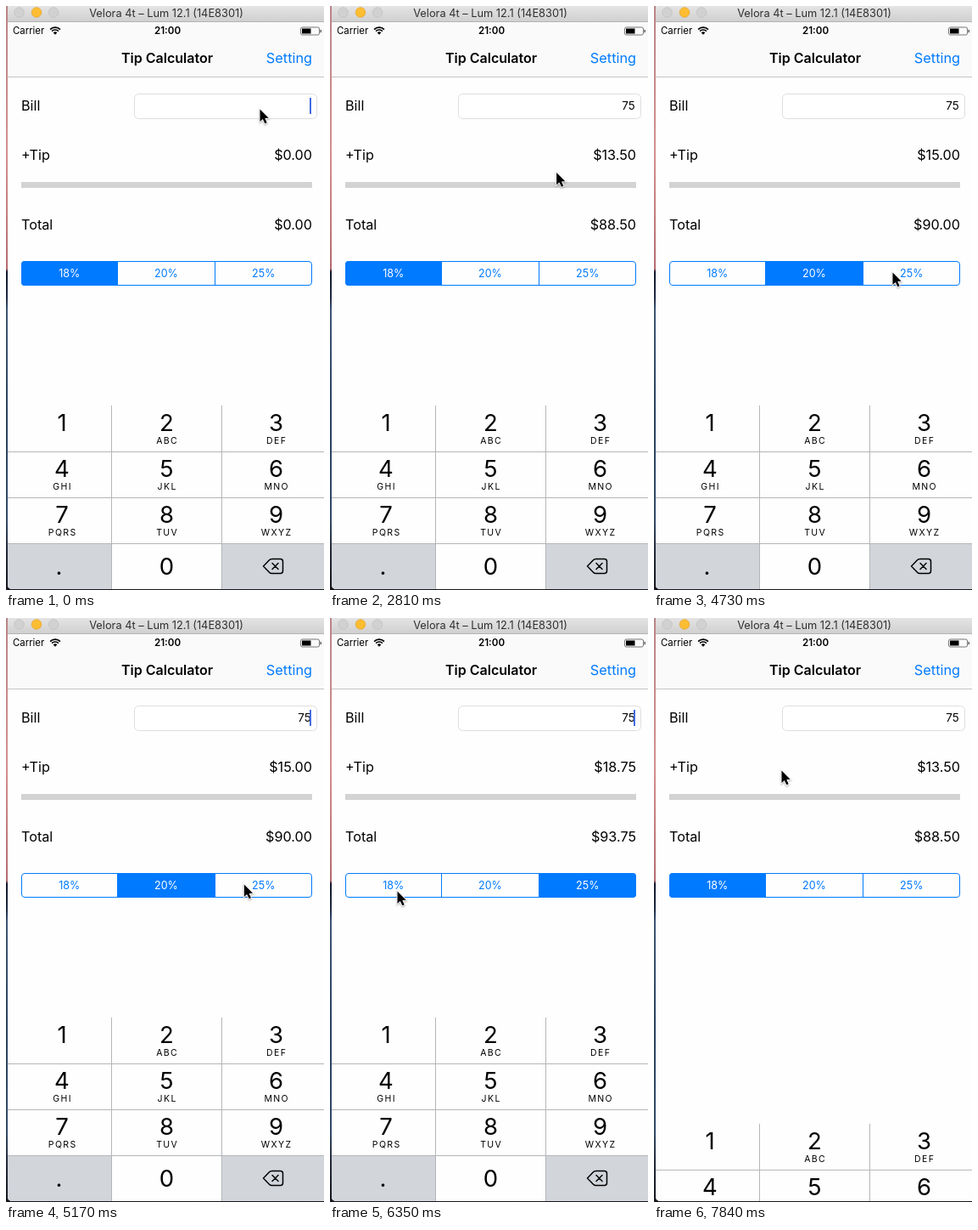
Animation, 375 px wide and 687 px high, one loop 7990 ms. Source, as an HTML page with a canvas:

```html
<!DOCTYPE html>
<html lang="en">
<head>
<meta charset="utf-8">
<title>Tip Calculator</title>
<style>
  html, body { margin: 0; width: 100%; height: 100%; overflow: hidden; background: #fff; }
  canvas { display: block; width: 375px; height: 687px; }
</style>
</head>
<body>
<canvas id="stage"></canvas>
<script>
const W = 375, H = 687, LOOP = 7990, STEP = 7840 / 53;
const BLUE = '#007aff';
const canvas = document.getElementById('stage');
const ctx = canvas.getContext('2d');
const ratio = window.devicePixelRatio || 1;
canvas.width = W * ratio;
canvas.height = H * ratio;

const clamp = v => Math.max(0, Math.min(1, v));
const smooth = v => { v = clamp(v); return v * v * (3 - 2 * v); };
const mix = (a, b, k) => a + (b - a) * k;

// Entries and selections, each starting a fade of the results.
const events = [
  { at: 900, bill: '7', seg: 0 },
  { at: 1500, bill: '75', seg: 0 },
  { at: 3450, bill: '75', seg: 1 },
  { at: 5570, bill: '75', seg: 2 },
  { at: 6670, bill: '75', seg: 0 }
];
const rates = [18, 20, 25];

// Pointer path: time, x, y.
const path = [
  [2600, 299, 122], [3130, 206, 336], [3420, 195, 319], [3760, 195, 319],
  [4640, 281, 314], [5500, 280, 314], [5790, 280, 314], [6050, 79, 322],
  [7130, 79, 322], [7640, 150, 180]
];

function pointer(t) {
  const i = path.findIndex(p => p[0] > t);
  if (i === 0) return path[0].slice(1);
  if (i < 0) return path[path.length - 1].slice(1);
  const [a, b] = [path[i - 1], path[i]];
  const k = smooth((t - a[0]) / (b[0] - a[0]));
  return [mix(a[1], b[1], k), mix(a[2], b[2], k)];
}

function caretAlpha(t) {
  if (t >= 900 && t < 1590) return 1;
  const p = t < 900 ? t - 110 : (t - 1590) % 1000;
  if (p < 0) return 1;
  return p < 400 ? 1 - smooth(p / 130) : smooth((p - 400) / 200);
}

function rect(x, y, w, h, color) {
  ctx.fillStyle = color;
  ctx.fillRect(x, y, w, h);
}

function round(x, y, w, h, r) {
  ctx.beginPath();
  ctx.roundRect(x, y, w, h, r);
}

function disc(x, y, r, fill, stroke) {
  ctx.beginPath();
  ctx.arc(x, y, r, 0, 7);
  ctx.fillStyle = fill;
  ctx.fill();
  ctx.strokeStyle = stroke;
  ctx.lineWidth = 0.7;
  ctx.stroke();
}

function text(str, x, y, size, { align = 'left', color = '#000', weight = 400, spacing = 0 } = {}) {
  ctx.font = `${weight} ${size}px Inter, sans-serif`;
  ctx.letterSpacing = spacing + 'px';
  ctx.textAlign = align;
  ctx.fillStyle = color;
  ctx.fillText(str, x, y);
}

function vertical(y0, y1, stops) {
  const g = ctx.createLinearGradient(0, y0, 0, y1);
  stops.forEach(([k, c]) => g.addColorStop(k, c));
  return g;
}

function drawDesktop() {
  rect(0, 0, W, H, vertical(0, H, [
    [0, '#b98587'], [0.25, '#d3918e'], [0.45, '#b46b70'], [0.455, '#141a2c'],
    [0.5, '#202c47'], [0.52, '#3d5877'], [0.7, '#2b425f'], [0.88, '#334c69'],
    [0.93, '#252b3c'], [1, '#15171c']
  ]));
}

function drawTitleBar() {
  rect(2, 0, 373, 18, vertical(0, 18, [[0, '#e5e4e5'], [1, '#d1d0d1']]));
  rect(2, 18, 373, 1, '#b5b4b5');
  disc(15.5, 7.5, 5.8, '#d2d1d2', '#bebdbe');
  disc(36, 7.5, 5.8, '#fdbd32', '#df9f25');
  disc(56, 7.5, 5.8, '#d2d1d2', '#bebdbe');
  text('Velora 4t – Lum 12.1 (14E8301)', 189, 13, 12.8, { align: 'center', color: '#303030' });
}

function drawStatusBar() {
  text('Carrier', 8, 33.3, 11.4);
  text('21:00', 190.5, 33.3, 11.6, { align: 'center', weight: 600 });
  ctx.strokeStyle = '#000';
  ctx.lineWidth = 1.7;
  [8.4, 5.5].forEach(r => {
    ctx.beginPath();
    ctx.arc(58, 33.5, r, -Math.PI * 0.75, -Math.PI * 0.25);
    ctx.stroke();
  });
  ctx.beginPath();
  ctx.moveTo(58, 33.7);
  ctx.arc(58, 33.7, 3.2, -Math.PI * 0.75, -Math.PI * 0.25);
  ctx.fillStyle = '#000';
  ctx.fill();

  round(347.5, 25, 22, 9, 2);
  ctx.strokeStyle = '#555';
  ctx.lineWidth = 0.8;
  ctx.stroke();
  rect(349, 26.5, 10.5, 6, '#000');
  rect(370.5, 28, 1.4, 3.2, '#555');
}

function drawNav() {
  rect(2, 19, 373, 64, '#fafafa');
  rect(2, 83, 373, 1, '#c5c5c7');
  drawStatusBar();
  text('Tip Calculator', 190, 67, 16, { align: 'center', weight: 600 });
  text('Setting', 361, 67, 16.3, { align: 'right', color: BLUE });
}

function drawForm(t, event) {
  text('Bill', 18, 122.5, 16.2);
  round(151.5, 103.5, 215, 29, 5);
  ctx.fillStyle = '#fff';
  ctx.fill();
  ctx.strokeStyle = '#dedede';
  ctx.lineWidth = 1;
  ctx.stroke();
  if (event) text(event.bill, 359.7, 122.3, 13.4, { align: 'right' });
  ctx.globalAlpha = caretAlpha(t);
  rect(358, 108, 2, 19, '#426bdf');

  const bill = event ? +event.bill : 0;
  const tip = bill * rates[event ? event.seg : 0] / 100;
  ctx.globalAlpha = event ? smooth((t - event.at) / 300) : 1;
  text('+Tip', 18, 180.5, 16.2);
  text('$' + tip.toFixed(2), 361, 180.5, 16.2, { align: 'right' });
  text('Total', 18, 262.5, 16.2);
  text('$' + (bill + tip).toFixed(2), 361, 262.5, 16.2, { align: 'right' });
  ctx.globalAlpha = 1;
  rect(18, 207, 343, 7, '#d3d3d3');
}

function drawSegments(t, event, previous) {
  const edges = [18, 131.5, 246.5, 361];
  const now = event ? event.seg : 0;
  const before = previous ? previous.seg : 0;
  const k = event ? smooth((t - event.at) / 135) : 1;
  ctx.save();
  round(18, 300, 343, 29, 4);
  ctx.clip();
  rates.forEach((rate, i) => {
    const on = mix(i === before ? 1 : 0, i === now ? 1 : 0, k);
    const x = edges[i], w = edges[i + 1] - x;
    ctx.globalAlpha = on;
    rect(x, 300, w, 29, BLUE);
    ctx.globalAlpha = 1;
    const color = `rgb(${255 * on}, ${mix(122, 255, on)}, 255)`;
    text(rate + '%', x + w / 2, 319, 12.5, { align: 'center', color });
  });
  ctx.restore();
  rect(131, 300, 1, 29, BLUE);
  rect(246, 300, 1, 29, BLUE);
  round(18.5, 300.5, 342, 28, 3.5);
  ctx.strokeStyle = BLUE;
  ctx.lineWidth = 1;
  ctx.stroke();
}

function drawDelete(x, y) {
  ctx.strokeStyle = '#000';
  ctx.lineWidth = 1.5;
  ctx.lineJoin = ctx.lineCap = 'round';
  ctx.beginPath();
  ctx.moveTo(x, y + 8.5);
  ctx.lineTo(x + 7, y + 1.3);
  ctx.quadraticCurveTo(x + 8.2, y, x + 10, y);
  ctx.lineTo(x + 20, y);
  ctx.quadraticCurveTo(x + 23, y, x + 23, y + 3);
  ctx.lineTo(x + 23, y + 14);
  ctx.quadraticCurveTo(x + 23, y + 17, x + 20, y + 17);
  ctx.lineTo(x + 10, y + 17);
  ctx.quadraticCurveTo(x + 8.2, y + 17, x + 7, y + 15.7);
  ctx.closePath();
  ctx.moveTo(x + 10.5, y + 5);
  ctx.lineTo(x + 17.5, y + 12);
  ctx.moveTo(x + 17.5, y + 5);
  ctx.lineTo(x + 10.5, y + 12);
  ctx.stroke();
}

function drawKeyboard(t) {
  const letters = ['', 'ABC', 'DEF', 'GHI', 'JKL', 'MNO', 'PQRS', 'TUV', 'WXYZ'];
  const centers = [66, 189.5, 318.5];
  const slide = 216 * (1 - Math.pow(1 - clamp((t - 7720) / 480), 3));
  ctx.save();
  ctx.translate(0, 470 + slide);
  rect(2, 0, 373, 216, '#fefefe');
  rect(2, 162, 122, 54, '#d2d5da');
  rect(255, 162, 120, 54, '#d2d5da');
  [54, 108, 162].forEach(y => rect(2, y, 373, 1, '#b4b5b8'));
  [124, 254].forEach(x => rect(x, 0, 1, 216, '#b4b5b8'));
  letters.forEach((label, i) => {
    const x = centers[i % 3], y = Math.floor(i / 3) * 54;
    text(i + 1, x, y + 30, 27.5, { align: 'center' });
    text(label, x + 0.7, y + 45, 10.5, { align: 'center', spacing: 1.4 });
  });
  text('0', 189.5, 199, 27.5, { align: 'center' });
  text('.', 62.5, 199, 27.5, { align: 'center' });
  drawDelete(303.5, 180.5);
  ctx.restore();
}

function drawPointer(t) {
  const [x, y] = pointer(t);
  const shape = [[0, 0], [0, 14.5], [3.3, 11.4], [5.8, 16.8], [8.2, 15.8], [5.8, 10.5], [10.2, 10.3]];
  ctx.save();
  ctx.translate(x + 0.5, y - 0.5);
  ctx.beginPath();
  shape.forEach(([px, py]) => ctx.lineTo(px, py));
  ctx.closePath();
  ctx.lineJoin = 'miter';
  ctx.shadowColor = 'rgba(0,0,0,.35)';
  ctx.shadowBlur = 2 * ratio;
  ctx.shadowOffsetY = ratio;
  ctx.strokeStyle = '#fff';
  ctx.lineWidth = 1.8;
  ctx.stroke();
  ctx.shadowColor = 'transparent';
  ctx.fillStyle = '#000';
  ctx.fill();
  ctx.restore();
}

function draw(t) {
  ctx.setTransform(ratio, 0, 0, ratio, 0, 0);
  const past = events.filter(e => e.at <= t);
  const event = past[past.length - 1], previous = past[past.length - 2];
  drawDesktop();
  ctx.save();
  round(2, 0, 380, 686, [0, 0, 0, 5]);
  ctx.clip();
  rect(2, 0, 373, 686, '#fefefe');
  drawTitleBar();
  drawNav();
  drawForm(t, event);
  drawSegments(t, event, previous);
  drawKeyboard(t);
  ctx.restore();
  drawPointer(t);
}

const start = performance.now();
function tick() {
  const t = (performance.now() - start) % LOOP;
  draw(Math.min(53, Math.floor((t + 14) / STEP)) * STEP);
  requestAnimationFrame(tick);
}
tick();
</script>
</body>
</html>
```
